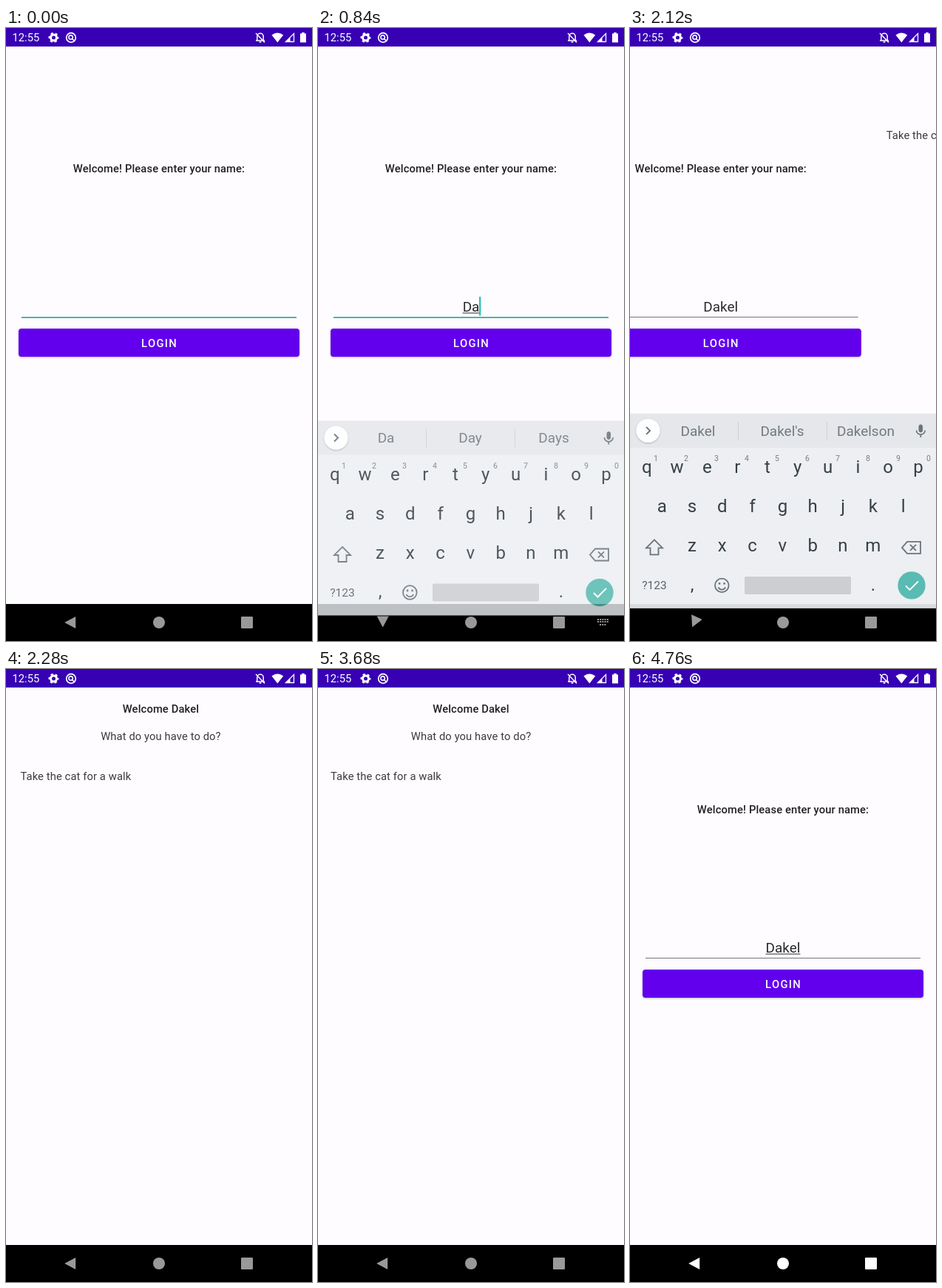
Recreate the animation shown at these times as an HTML page. Size 414 px wide and 828 px high, loop 4800 ms.

```html
<!DOCTYPE html>
<html lang="en">
<head>
<meta charset="utf-8">
<title>Login demo</title>
<style>
  html, body { margin: 0; width: 100%; height: 100%; overflow: hidden; background: #000; }
  svg { display: block; width: 414px; height: 828px; font: 14.76px Roboto, sans-serif; }
  .mid { text-anchor: middle; }
  .body { fill: #3c3b3f; letter-spacing: .1px; }
  .strong { fill: #212024; font-weight: 500; letter-spacing: .12px; }
  .login { fill: #fff; font-weight: 500; letter-spacing: 1.32px; }
  .entry { font-size: 18.97px; fill: #2b2a2e; }
  .key { font-size: 24px; fill: #263238; }
  .hint { font-size: 10.5px; fill: #6c767c; }
  .word { font-size: 18.97px; fill: #667076; }
  .line { fill: none; stroke-width: 2; }
</style>
</head>
<body>
<svg viewBox="0 0 414 828">
  <defs>
    <filter id="shadow" x="-20%" y="-20%" width="140%" height="150%">
      <feDropShadow dx="0" dy="1" stdDeviation="1" flood-opacity=".28"/>
    </filter>
  </defs>
  <rect width="414" height="828" fill="#fefcff"/>

  <g id="loginPage">
    <text class="strong mid" x="207" y="195">Welcome! Please enter your name:</text>
    <text id="entry" class="entry mid" x="207" y="383"></text>
    <rect id="underline" y="384.5" height="1" fill="#2b2a2e"/>
    <rect id="cursor" y="363" width="2.2" height="25.5" fill="#1fc4b2"/>
    <rect id="field" x="21" width="372"/>
    <rect x="17" y="406" width="380" height="38" rx="4" fill="#6200ee" filter="url(#shadow)"/>
    <text class="login mid" x="207.6" y="431">LOGIN</text>
  </g>

  <g id="homePage">
    <text id="greeting" class="strong mid" x="207" y="58.5"></text>
    <text class="body mid" x="207" y="95.5">What do you have to do?</text>
    <text class="body" x="17" y="149.8">Take the cat for a walk</text>
  </g>

  <rect width="414" height="25" fill="#3700b3"/>
  <g fill="#fff">
    <text x="8.5" y="18.3">12:55</text>
    <g fill="none" stroke="#fff">
      <circle cx="64.5" cy="13" r="4" stroke-width="3"/>
      <circle cx="64.5" cy="13" r="5.8" stroke-width="2.4" stroke-dasharray="3 3.07" stroke-dashoffset="1.5"/>
      <circle cx="88" cy="13" r="6.3" stroke-width="1.7"/>
      <circle cx="87.6" cy="12.6" r="2.7" stroke-width="1.6"/>
      <path d="M89.5 14.5L93 18M339.8 16.5V11.5a4.2 4.2 0 0 1 8.4 0V16.5M338 17H350M338 7L350 19.5" stroke-width="1.5"/>
      <path d="M378.5 18.5L389.5 7.5V18.5Z" stroke-width="1.3"/>
    </g>
    <path d="M342.3 18.3h3.4a1.7 1.7 0 0 1-3.4 0Z"/>
    <path d="M359.5 9.5Q367.3 3.6 375.2 9.5L367.3 19.5Z"/>
    <path d="M378 19L384.5 12.5V19Z"/>
    <path d="M398 7.5h2.2V6h3.6V7.5H406V19.5H398Z"/>
  </g>

  <rect y="778" width="414" height="50"/>
  <g id="keyboard">
    <rect y="515" width="414" height="263" fill="#eceff2"/>
    <rect y="515" width="414" height="46" fill="#e3e6e9"/>
    <path d="M146.5 526V551M266.5 526V551" stroke="#cbced1"/>
    <circle cx="24.5" cy="538" r="16" fill="#fff" filter="url(#shadow)"/>
    <path class="line" d="M22 533L27 538L22 543" stroke="#5f6a70"/>
    <g stroke="#5f6a70" class="line">
      <rect x="391" y="530" width="4.6" height="10" rx="2.3" fill="#5f6a70" stroke-width="1"/>
      <path d="M387.5 537.5a5.8 5.8 0 0 0 11.6 0M393.3 543.5V547" stroke-width="1.7"/>
      <path d="M33 685.5L44 696.5H38.5V705.5H27.5V696.5H22Z" stroke-width="1.8"/>
      <path d="M375 688H393V704H375L368 696ZM379 692L387 700M387 692L379 700" stroke-width="1.8"/>
      <circle cx="124.3" cy="747" r="9.3" stroke-width="1.8"/>
      <path d="M119.5 749.5a5.2 5.2 0 0 0 9.6 0" stroke-width="1.7"/>
    </g>
    <g fill="#5f6a70"><circle cx="121" cy="744.5" r="1.4"/><circle cx="127.6" cy="744.5" r="1.4"/></g>
    <rect x="155" y="735" width="144" height="24" rx="2" fill="#c8cbce"/>
    <circle cx="381" cy="747" r="18.7" fill="#4db6ac"/>
    <path class="line" d="M373 747.5L378.5 753L390 741.5" stroke="#fff"/>
    <text class="mid" x="33" y="752.5" fill="#4a565c" style="font-size:15.5px">?123</text>
  </g>

  <g id="nav">
    <path id="back" d="M-8.5 0L6.5 -8V8Z" stroke-linejoin="round"/>
    <circle cx="207" cy="803" r="8"/>
    <rect x="318" y="795" width="16" height="16" rx="1.2"/>
    <g id="switcher">
      <path d="M378 799H393M378 802H393M381 806H390" stroke="#999" stroke-width="2" stroke-dasharray="2 1.2" fill="none"/>
    </g>
  </g>
</svg>

<script>
const LOOP = 4800, NAME = "Dakel";
const FIRST_KEY = 640, KEY_GAP = 160;
const LEAVE = 2048, RETURN = 3800, SLIDE = 245;
const WORDS = [
  ["Da", "Day", "Days"],
  ["Dak", NAME, "Dakes"],
  [NAME, NAME + "'s", NAME + "son"]
];

const $ = id => document.getElementById(id);
const progress = (t, start, length) => Math.min(1, Math.max(0, (t - start) / length));
const smooth = p => (1 - Math.cos(Math.PI * p)) / 2;
const show = (node, on) => node.setAttribute("visibility", on ? "inherit" : "hidden");
const setAll = (node, attrs) => {
  for (const name in attrs) node.setAttribute(name, attrs[name]);
};

function addText(text, x, y, kind) {
  const node = document.createElementNS("http://www.w3.org/2000/svg", "text");
  setAll(node, { x, y, class: kind + " mid" });
  node.textContent = text;
  $("keyboard").append(node);
  return node;
}

[["qwertyuiop", 22.8, 595.5], ["asdfghjkl", 43.2, 648.5], ["zxcvbnm", 84, 701.5]]
  .forEach(([row, x, y]) => [...row].forEach((c, i) => addText(c, x + i * 40.8, y, "key")));
[..."1234567890"].forEach((c, i) => addText(c, 35 + i * 41, 579.5, "hint"));
addText(",", 84, 754, "key");
addText(".", 329, 754, "key");
const suggestions = [92, 206, 319].map(x => addText("", x, 545, "word"));
$("greeting").textContent = "Welcome " + NAME;

function drawEntry(t) {
  const typed = t < FIRST_KEY ? 0 : Math.min(NAME.length, Math.floor((t - FIRST_KEY) / KEY_GAP) + 1);
  const focused = t < LEAVE - 16;
  const lastKey = FIRST_KEY + (NAME.length - 1) * KEY_GAP;
  const blink = t < FIRST_KEY ? t >= 250 : t < lastKey + 500;

  $("entry").textContent = NAME.slice(0, typed);
  const width = typed ? $("entry").getComputedTextLength() : 0;
  setAll($("underline"), { x: 207 - width / 2, width });
  show($("underline"), focused || t >= RETURN);
  $("cursor").setAttribute("x", 207 + width / 2 - .3);
  show($("cursor"), focused && blink);
  setAll($("field"), focused
    ? { y: 390, height: 2, fill: "#4ab5a9" }
    : { y: 390, height: 1, fill: "#77757a" });

  const words = WORDS[typed < 3 ? 0 : typed < 5 ? 1 : 2];
  suggestions.forEach((node, i) => node.textContent = words[i]);
}

function drawPages(t) {
  const p = smooth(progress(t, LEAVE, SLIDE)) - smooth(progress(t, RETURN, SLIDE));
  $("loginPage").setAttribute("transform", `translate(${-414 * p})`);
  $("homePage").setAttribute("transform", `translate(${414 * (1 - p)})`);
  show($("loginPage"), p < 1);
  show($("homePage"), p > 0);
}

function drawKeyboard(t) {
  const alpha = 1 - (1 - progress(t, 757, 300)) ** 5 - progress(t, 2032, 150) ** 5;
  setAll($("keyboard"), { opacity: alpha, transform: `translate(0 ${80 * (1 - alpha)})` });
  show($("keyboard"), alpha > 0);
}

function drawNav(t) {
  const turn = progress(t, 640, 150) - progress(t, 2080, 150);
  const grey = Math.round(153 + 102 * progress(t, 3700, 160));
  $("nav").setAttribute("fill", `rgb(${grey},${grey},${grey})`);
  $("back").setAttribute("transform", `translate(87.7 ${803 - 2 * turn}) rotate(${-90 * turn})`);
  show($("switcher"), t >= 700 && t < 2080);
}

function frame(now) {
  const t = now % LOOP;
  drawEntry(t);
  drawPages(t);
  drawKeyboard(t);
  drawNav(t);
  requestAnimationFrame(frame);
}
frame(0);
</script>
</body>
</html>
```
